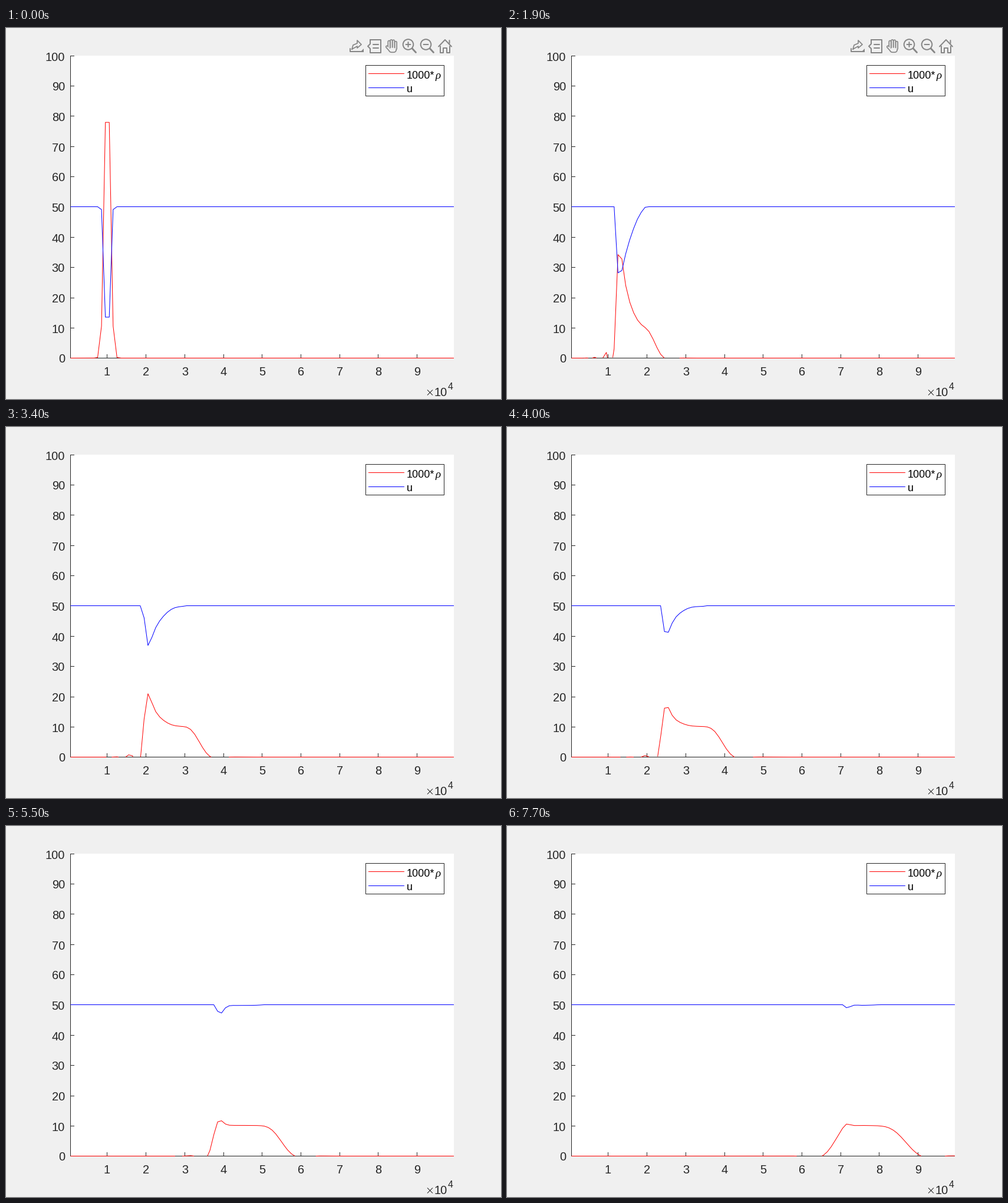
These frames come from a looping animation (840x630 px, 7800 ms). A matplotlib script:

```python
import numpy as np
import matplotlib.pyplot as plt
from matplotlib.animation import FuncAnimation
from matplotlib.patches import Circle, Polygon, Rectangle

W, H, DPI = 840, 630, 100
PX = 72 / DPI                       # points per pixel
BACK, INK, ICON = "#f0f0f0", "#262626", "#868686"
RED, BLUE = "#ff0000", "#0000ff"

# ---- traffic flow: logarithmic speed law with a speed limit ----
N, DX = 100, 1000.0
V_MAX, RHO_FREE, RHO_JAM = 50.0, 0.01, 1 / 6
V_LOG = V_MAX / np.log(RHO_JAM / RHO_FREE)
cells = (np.arange(N) + 0.5) * DX


def speed(rho):
    return V_MAX - V_LOG * np.log(np.maximum(rho, RHO_FREE) / RHO_FREE)


def rate(rho):
    """Third-order upwind-biased difference of the flow."""
    q = np.pad(rho * speed(rho), 2, mode="edge")
    return -(q[:-4] - 6 * q[1:-3] + 3 * q[2:-2] + 2 * q[3:-1]) / (6 * DX)


def advance(rho, dt):
    """One third-order Runge-Kutta step (Bogacki-Shampine)."""
    k1 = rate(rho)
    k2 = rate(rho + dt / 2 * k1)
    k3 = rate(rho + dt * 3 / 4 * k2)
    return rho + dt / 9 * (2 * k1 + 3 * k2 + 4 * k3)


# One step per picture; the steps grow as the solution gets smoother.
FRAMES, HOLD, TOOLBAR_FRAMES = 78, 4, 31
times = np.interp(np.arange(FRAMES - HOLD),
                  [0, 8, 30, 43, 59, 73], [0, 94, 440, 683, 1041, 1495])
states = [0.1 * np.exp(-((cells - 1e4) / 1000) ** 2)]
for dt in np.diff(times):
    states.append(advance(states[-1], dt))

# ---- stage in pixel coordinates ----
fig = plt.figure(figsize=(W / DPI, H / DPI), dpi=DPI, facecolor=BACK)
ax = fig.add_axes([0, 0, 1, 1])
ax.set(xlim=(0, W), ylim=(H, 0))
ax.axis("off")


def px_x(x):
    return 109.5 + (x - 500) * 650.5 / 99000


def px_y(value):
    return 560.5 - 5.14 * value


def line(xs, ys, color=INK, width=1.0, z=2, **kw):
    return ax.plot(xs, ys, color=color, lw=width * PX, zorder=z,
                   solid_capstyle="butt", snap=False, **kw)[0]


def box(x, y, w, h, edge="none", z=1):
    ax.add_patch(Rectangle((x, y), w, h, fc="white", ec=edge, lw=PX,
                           zorder=z, snap=False))


def label(x, y, text, size=20, ha="left", color=INK, font="Liberation Sans", **kw):
    ax.text(x, y, text, fontsize=size * PX, ha=ha, va="baseline",
            color=color, family=font, zorder=6, **kw)


def draw_axes():
    box(109, 47, 651, 514)
    line([109.5, 109.5], [47, 561])
    line([109, 760], [560.5, 560.5])
    for value in range(0, 101, 10):
        y = np.floor(560.7 - 5.1345 * value) + 0.5
        line([109, 116], [y, y])
        label(100, y + 8, str(value), ha="right")
    for i in range(1, 10):
        x = np.floor(px_x(i * 1e4)) + 0.5
        line([x, x], [554, 561])
        label(x, 590, str(i), ha="center")
    line([715, 724], [614.5, 623.5])
    line([715, 724], [623.5, 614.5])
    label(727, 625, "10")
    label(750, 614, "4", size=16)


def draw_legend():
    box(610.5, 63.5, 133, 52, edge=INK, z=5)
    line([615, 676], [77.5, 77.5], RED, z=6)
    line([615, 676], [101.5, 101.5], BLUE, z=6)
    label(680, 86, "1000*", size=18, color="black")
    label(728, 86, "ρ", size=19, color="black", font="Liberation Serif",
          style="italic")
    label(680, 109, "u", size=18, color="black")


def draw_toolbar():
    parts = []

    def stroke(*points, width=2.0, color=ICON):
        part = line(*zip(*points), color, width)
        part.set(solid_joinstyle="round", solid_capstyle="round")
        parts.append(part)

    def patch(shape):
        parts.append(ax.add_patch(shape))

    # export
    stroke((584, 35), (584, 40), (603, 40))
    stroke((587, 36), (589, 29), (596, 26), (596, 21), (603, 28), (596, 34),
           (596, 31), (587, 36), width=1.7)
    patch(Polygon([(607, 35), (607, 41), (601, 41)], fc=ICON, ec="none"))
    # data tip
    stroke((618, 20), (636, 20), (636, 42), (618, 42), (618, 35), (614, 31),
           (618, 27), (618, 20))
    for y in (28, 34):
        stroke((623, y), (632, y))
    # hand: wide strokes with a lighter core leave an outline
    for color, width in ((ICON, 5.2), (BACK, 1.8)):
        for i in range(4):
            x = 650 + 3.8 * i
            stroke((x, 35), (x, 21.5 + (i - 1.3) ** 2), width=width, color=color)
        stroke((652, 38), (646.5, 32), width=width, color=color)
        stroke((654, 37), (658, 37), width=width + 5, color=color)
    # magnifiers
    for x in (682.5, 712.5):
        patch(Circle((x, 28), 8.8, fc="none", ec=ICON, lw=2 * PX))
        stroke((x + 7, 35), (x + 13, 41.5), width=2.8)
        stroke((x - 4, 28), (x + 4, 28))
    stroke((682.5, 24), (682.5, 32))
    # home
    stroke((734, 31.5), (745, 20), (756, 31.5))
    stroke((752.5, 26), (752.5, 21))
    stroke((737, 31), (737, 42), (742, 42), (742, 34), (748, 34), (748, 42),
           (753, 42), (753, 31))
    return parts


draw_axes()
draw_legend()
toolbar = draw_toolbar()
density_line = line([], [], RED, z=3)
speed_line = line([], [], BLUE, z=4)
fine = np.linspace(cells[0], cells[-1], 20 * (N - 1) + 1)


def update(frame):
    rho = states[max(0, frame - HOLD)]
    density = np.interp(fine, cells, 1000 * rho)
    density[density < -0.01] = np.nan     # cut off below the axis
    density_line.set_data(px_x(fine), px_y(density))
    speed_line.set_data(px_x(cells), px_y(speed(rho)))
    for part in toolbar:
        part.set_visible(frame < TOOLBAR_FRAMES)
    return [density_line, speed_line, *toolbar]


anim = FuncAnimation(fig, update, frames=FRAMES, interval=100, repeat=True,
                     repeat_delay=0, blit=False)
plt.show()
```
